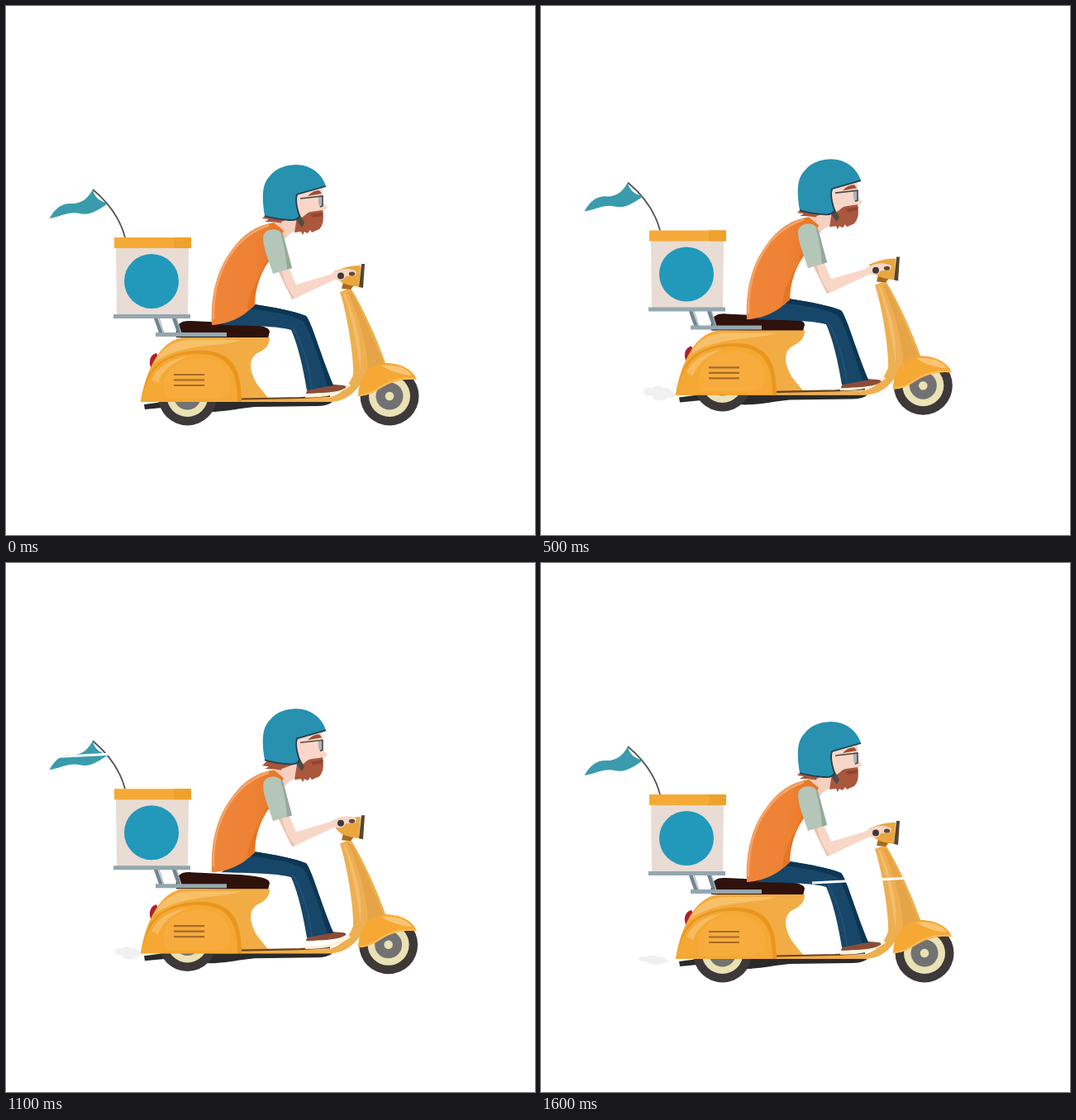
An HTML page that plays this animation: 640 by 640 pixels, repeating every 1700 ms.

```html
<!DOCTYPE html>
<html lang="en">
<head>
<meta charset="utf-8">
<title>Scooter delivery</title>
<style>
html, body { margin: 0; width: 100%; height: 100%; overflow: hidden; background: #fff; }
svg { display: block; width: 100vw; height: 100vh; }
</style>
</head>
<body>
<svg viewBox="0 0 640 640">
  <defs>
    <linearGradient id="paint"><stop stop-color="#f5a938"/><stop offset="1" stop-color="#edb055"/></linearGradient>
    <linearGradient id="shirt"><stop stop-color="#ef8539"/><stop offset=".6" stop-color="#ee8134"/><stop offset="1" stop-color="#e67523"/></linearGradient>
    <g id="wheel">
      <circle r="35.5" fill="#3d3938"/>
      <circle r="25" fill="#eae1b5"/>
      <circle r="16.5" fill="#727272"/>
      <circle r="5.3" fill="#eae1b5"/>
    </g>
  </defs>

  <g id="smoke" fill="#f0f0f0">
    <ellipse cx=".2" cy=".4" rx=".2" ry=".28"/>
    <ellipse cx=".46" cy=".38" rx=".22" ry=".38"/>
    <ellipse cx=".72" cy=".44" rx=".2" ry=".3"/>
    <ellipse cx=".55" cy=".72" rx=".26" ry=".28"/>
    <ellipse cx=".87" cy=".6" rx=".13" ry=".22"/>
  </g>

  <g class="body">
    <path d="M167 482L190 479H395Q389 484 376 484L301 485C280 487 266 491 246 491L200 485 168 488Z" fill="#2b2a2a"/>
    <path d="M182 420C172 422 172 436 178 441L188 432Z" fill="#b01f2c"/>
  </g>
  <use href="#wheel" id="rear"/>
  <use href="#wheel" id="front"/>

  <g class="body">
    <!-- flag and box -->
    <path d="M144 280C138 257 123 237 105 222" fill="none" stroke="#57534f" stroke-width="1.8"/>
    <path d="M52.5 257C60 244 68 238 80 239C93 239 100 231 105 222C107 232 114 236 123 239C112 247 101 254 89 251C77 248 65 255 52.5 257Z" fill="#399bac"/>
    <path d="M133 292H221L220 374H134Z" fill="#e8dcd4"/>
    <path d="M131 280H224V293H131Z" fill="#f5aa38"/>
    <path d="M203 280H224V293H203Z" fill="#eea22d"/>
    <circle cx="176" cy="333" r="33" fill="#2299ba"/>

    <!-- seat and rack -->
    <path d="M206 401C204 385 211 380 224 381L286 384C306 386 319 388 319 394L317 402Z" fill="#2f120c"/>
    <path d="M181 377L188 397M203 377L210 397" stroke="#73858e" stroke-width="4.5"/>
    <path d="M185 377L191 396M206 377L212 396" stroke="#a8b8be" stroke-width="1.2"/>
    <path d="M130 373H223V378H130ZM181 395H267V400H181Z" fill="#94a7b0"/>

    <!-- chassis -->
    <path d="M163 479C166 458 172 441 181 426C189 412 201 403 214 401H319C319 411 313 416 304 420C292 428 295 443 304 458L317 474H388C403 472 414 462 420 446C421 425 413 374 404 346L417 341C433 367 449 403 460 434L436 446C426 465 412 479 392 479Z" fill="url(#paint)"/>
    <path d="M180 431C188 415 200 406 220 404H284C264 413 215 406 180 431Z" fill="#f7c069"/>
    <path d="M163 479C167 456 174 440 184 432C202 419 230 413 254 419C279 427 284 446 285 479Z" fill="#e9961f"/>
    <path d="M163 479C167 457 176 442 188 432C204 421 232 418 250 423C274 430 280 449 280 479Z" fill="#f5a833"/>
    <path d="M193 475C184 447 204 426 235 426C262 427 274 444 270 465Q266 475 246 475Z" fill="#f7ac3d"/>
    <path d="M176 452C183 437 198 427 220 424C199 433 190 441 184 456Z" fill="#f7bb60"/>
    <path d="M203 446H240M203 452.5H240M203 459H240" stroke="#a66b27" stroke-width="2.2"/>
    <path d="M285 475.5L356 474 392 472" fill="none" stroke="#6c4319" stroke-width="2.2"/>
    <path d="M362 472C388 472 402 468 416 458" fill="none" stroke="#fff3d5" stroke-width="3.5"/>
    <path d="M413 345C425 371 437 407 438 440L458 434C445 405 432 372 418 346Z" fill="#e6a448"/>
    <path d="M410 347C420 371 432 405 429 441C425 413 418 372 408 348Z" fill="#f3bd6c"/>

    <!-- front fender and handlebar -->
    <path d="M426 472C427 449 439 433 460 432C479 432 493 441 497 452C477 450 461 457 449 465Q439 471 426 472Z" fill="#f5a833"/>
    <path d="M454 435C473 433 486 439 491 447C479 446 465 442 454 435Z" fill="#f9c574"/>
    <path d="M428 471C440 471 449 463 460 457Q477 449 496 451" fill="none" stroke="#f9bd5e" stroke-width="2"/>
    <path d="M408 334L421 338 417 343 406 342Z" fill="#a8691f"/>
    <path d="M397 321C405 319 411 314 429 314L427 340 416 338C407 336 398 331 397 321Z" fill="#eba73e"/>
    <path d="M430 312H434L432 341 427 340Z" fill="#57472f"/>
  </g>

  <g id="rider">
    <path d="M363 469C364 461 373 460 386 457L409 459Q414 461 409 463C399 468 384 468 363 469Z" fill="#8c4c37"/>
    <path d="M260 386L301 361C326 365 348 369 363 375C370 383 380 421 396 459L364 465C359 434 352 407 345 392C328 387 296 387 260 386Z" fill="#174668"/>
    <path d="M301 361C326 365 348 369 363 375C370 383 380 421 396 459L389 460C379 426 367 390 359 381C344 373 323 370 294 366Z" fill="#0c3653"/>
    <path d="M347 389C360 410 367 438 370 463" fill="none" stroke="#24547a" stroke-width="1.5"/>
    <path d="M323 263L345 253 353 268Q342 272 338 282Z" fill="#f3cbb9"/>
    <path d="M249 386C247 349 256 318 272 297C286 276 304 265 324 262L336 272 320 306C309 320 301 340 301 362C289 373 276 384 249 386Z" fill="url(#shirt)"/>
    <path d="M251 379C249 337 266 282 318 265" fill="none" stroke="#f6a365" stroke-width="3"/>
    <path d="M316 302C312 326 295 335 292 368L301 362C301 340 309 320 320 306Z" fill="#e57524"/>
    <path d="M329 320L342 316 351 337 392 325C401 319 412 315 424 321L423 326 411 327Q407 335 398 331L347 355Z" fill="#f8d7c8"/>
    <path d="M329 320L334 321C338 337 342 344 349 353L346 355Z" fill="#eec1af"/>
    <path d="M311 280C312 268 332 267 335 278L346 317 323 324C318 308 311 293 311 280Z" fill="#b4c6b8"/>
    <path d="M332 274Q335 275 336 279L346 317 340 319C339 302 336 288 332 274Z" fill="#95aa9d"/>
    <circle cx="405" cy="326.5" r="4" fill="#403a37"/>
    <ellipse cx="418.5" cy="324" rx="3.7" ry="2.5" fill="#5e493a"/>
    <path d="M310 257L320 247H355V263C341 266 330 260 313 261L318 258Z" fill="#a5553b"/>
    <path d="M333 261L352 254 353 270 338 279Z" fill="#f5d0c0"/>
    <path d="M351 221L383 214V237L389 244 384 248 382 256 352 261Z" fill="#f8d7c8"/>
    <path d="M349 274L352 255C361 259 361 250 369 249L383 247Q386 263 379 270L370 274 368 271 365 275 361 273 359 277 357 273Z" fill="#a9573d"/>
    <path d="M369 252L384 250 382 254 371 256Z" fill="#91452f"/>
  </g>

  <g id="helmet">
    <path d="M365 230Q371 223 379 223L382 227Z" fill="#9d4e36"/>
    <path d="M378 230L383 229V242L380 244Q377 238 378 230Z" fill="#a9b3b5"/>
    <path d="M356 233L383 230V242L380 243" fill="none" stroke="#484848" stroke-width="1.6"/>
    <path d="M353 248L361 262 358 268 350 257Z" fill="#504b44"/>
    <path d="M313 254C309 230 310 215 319 206C327 195 341 192 351 192C369 192 383 204 387 218L353 228C349 237 354 247 355 254Q353 260 342 259Q326 258 313 254Z" fill="#2791af"/>
    <path d="M387 218L352 228C349 237 353 247 355 254Q353 260 342 259Q326 258 313 254" fill="none" stroke="#263e4d" stroke-width="1.8"/>
  </g>

  <path id="wind" fill="none" stroke="#fff" stroke-width="3"/>
</svg>
<script>
const STEP = 100, STEPS = 17, LAST = STEPS - 1;
const $ = id => document.getElementById(id);
const bodyParts = document.querySelectorAll(".body");

// Half a sine wave for p from 0 to 1, flat outside.
const hump = p => p > 0 && p < 1 ? Math.sin(Math.PI * p) : 0;

// Short gusts that cut across the drawing: step, x, y, width
const gusts = [[4, 355, 443, 142], [11, 50, 235, 74], [13, 256, 306, 92], [16, 328, 387, 114]];

function place(el, x, y, w = 1, h = 1) {
  el.setAttribute("transform", `translate(${x} ${y}) scale(${w} ${h})`);
}

function drawScooter(step, lift) {
  bodyParts.forEach(el => place(el, 0, -lift));
  place($("rear"), 219.5, 472 - 2 * lift);
  place($("front"), 464 - .2 * lift, 472 - 1.5 * lift);

  // The rider lags behind the scooter, and the helmet hops after the rider.
  const riderLift = 12.2 * hump((step / LAST) ** 1.43);
  place($("rider"), 0, -riderLift);
  place($("helmet"), 0, -riderLift - 4 * hump((step - 7) / 9));
}

// Two puffs per loop, each growing backwards from the exhaust.
function drawSmoke(step, lift) {
  const age = step ? (step - 1) % 8 / 8 : 0;
  const left = 118 + 24 * (1 - age) ** 2;
  const right = 163 - 16 * age ** 4;
  const height = 18 * Math.sqrt(hump(age));
  place($("smoke"), left, 486 - lift - height, right - left, height);
}

function drawWind(step) {
  const gust = gusts.find(g => g[0] === step);
  $("wind").setAttribute("d", gust ? `M${gust[1]} ${gust[2]}l${gust[3]} ${-.05 * gust[3]}` : "");
}

function frame() {
  const step = Math.floor(performance.now() / STEP) % STEPS;
  const lift = 10.6 * hump(step / 15) ** 1.5;
  drawScooter(step, lift);
  drawSmoke(step, lift);
  drawWind(step);
  requestAnimationFrame(frame);
}
frame();
</script>
</body>
</html>
```
